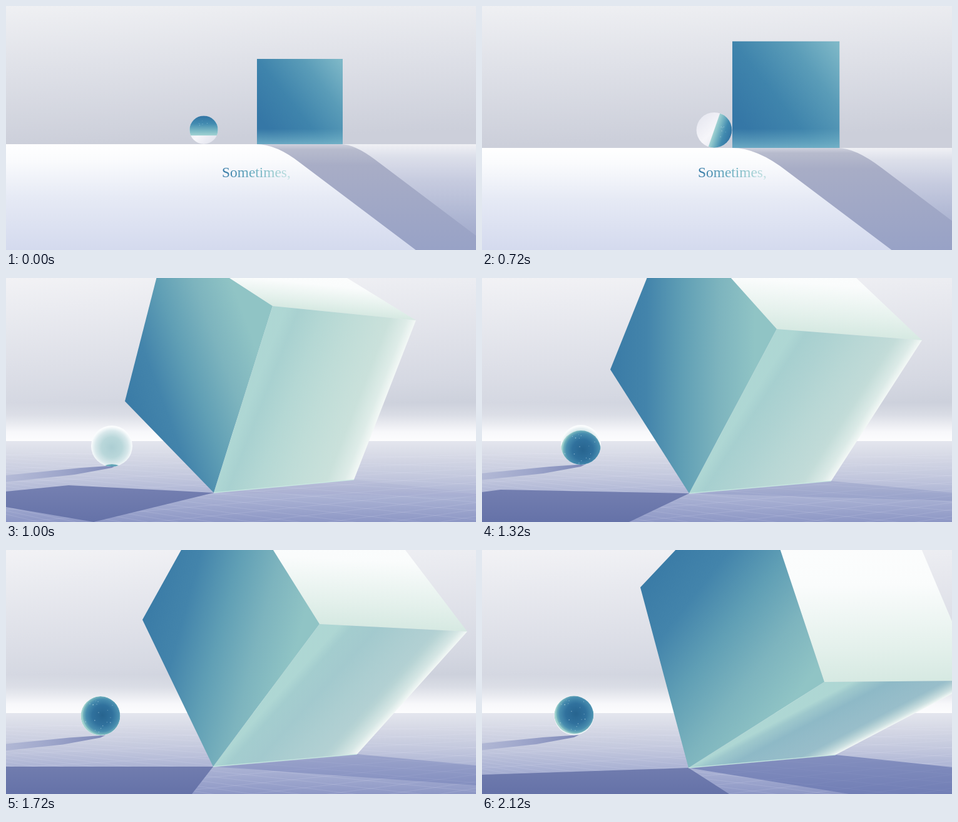
Write an HTML page with a canvas that moves like this. It is 751x392 px and loops after 2.2 s.

```html
<!DOCTYPE html>
<html lang="en">
<head>
<meta charset="utf-8">
<title>Ball and box</title>
<style>
html, body { margin: 0; width: 751px; height: 392px; overflow: hidden; }
canvas { display: block; }
</style>
</head>
<body>
<canvas id="stage" width="751" height="392"></canvas>
<script>
const W = 751, H = 392, LOOP = 2200, FPS = 15, CUT = 12;
const c = document.getElementById('stage').getContext('2d');

// Smooth curve through key values, held outside the key range
function track(keys, vals, k) {
  const n = keys.length - 1;
  if (k <= keys[0]) return vals[0];
  if (k >= keys[n]) return vals[n];
  let i = 0;
  while (k >= keys[i + 1]) i++;
  const slope = j => {
    const a = Math.max(0, j - 1), b = Math.min(n, j + 1);
    return (vals[b] - vals[a]) / (keys[b] - keys[a]);
  };
  const d = keys[i + 1] - keys[i], u = (k - keys[i]) / d, v = 1 - u;
  return v * v * (1 + 2 * u) * vals[i] + u * u * (3 - 2 * u) * vals[i + 1]
    + d * u * v * (v * slope(i) - u * slope(i + 1));
}

function stops(g, list) {
  for (let i = 0; i < list.length; i += 2) g.addColorStop(list[i], list[i + 1]);
  return g;
}
const linear = (x0, y0, x1, y1, ...list) => stops(c.createLinearGradient(x0, y0, x1, y1), list);
const down = (y0, y1, ...list) => linear(0, y0, 0, y1, ...list);
const radial = (x, y, r, ...list) => stops(c.createRadialGradient(x, y, 0, x, y, r), list);
const between = (p, q, u) => [p[0] + (q[0] - p[0]) * u, p[1] + (q[1] - p[1]) * u];

// Gradient that runs square from the line pq towards the point far
function fromEdge(p, q, far, ...list) {
  const dx = q[0] - p[0], dy = q[1] - p[1], len = Math.hypot(dx, dy);
  const nx = -dy / len, ny = dx / len;
  const dist = (far[0] - p[0]) * nx + (far[1] - p[1]) * ny;
  return linear(p[0], p[1], p[0] + nx * dist, p[1] + ny * dist, ...list);
}

function rect(x, y, w, h, fill) {
  c.fillStyle = fill;
  c.fillRect(x, y, w, h);
}

function poly(fill, ...pts) {
  c.beginPath();
  pts.forEach(p => c.lineTo(p[0], p[1]));
  c.closePath();
  c.fillStyle = fill;
  c.fill();
}

function disc(x, y, r, fill) {
  c.beginPath();
  c.arc(x, y, r, 0, 2 * Math.PI);
  c.fillStyle = fill;
  c.fill();
}

function specks(count, r, size) {
  let seed = 7;
  const rnd = () => (seed = seed * 16807 % 2147483647) / 2147483647;
  rnd();
  for (let i = 0; i < count; i++) {
    const a = rnd() * 2 * Math.PI, d = r * Math.sqrt(rnd());
    disc(Math.cos(a) * d, Math.sin(a) * d, size * (.5 + rnd() * .5), 'rgba(205,232,240,.6)');
  }
}

// Scene one: flat side view

const ROLL = [0, 5, 7.5, 11];

function ramp(x0, x1, cx, x2, y2, fill) {
  c.beginPath();
  c.moveTo(x0, 222);
  c.lineTo(x1, 222);
  c.quadraticCurveTo(cx, 222, x2, y2);
  c.lineTo(x2 + 330, y2 + 250);
  c.lineTo(x0, y2 + 250);
  c.fillStyle = fill;
  c.fill();
}

function flatBall(k) {
  const r = 22.7, cut = track(ROLL, [.4, 0, 0, 0], k) * r;
  c.save();
  c.translate(track(ROLL, [316, 276.5, 236, 376.8], k), 199);
  disc(0, 0, r, linear(-r, -r, r, r, 0, '#e3e4ee', .5, '#f6f6fa', 1, '#dcdeea'));
  c.clip();
  c.rotate(track(ROLL, [-90, -124, -150, 19], k) * Math.PI / 180);
  rect(-cut, -r, r + cut, 2 * r,
    linear(-cut, 0, r, 0, 0, '#a2d3d3', .25, '#79b7c4', .6, '#428bb0', 1, '#3274a3'));
  c.translate(r * .45, 0);
  specks(6, r * .4, .6);
  c.restore();
}

function flatScene(k) {
  rect(0, 0, W, H, linear(0, 0, 8, 225, 0, '#eff0f3', .45, '#dfe1e8', 1, '#cccfda'));

  const z = 1 + .0625 * Math.max(0, k - 9) ** 2;
  const bottom = 198 + 194 / z;
  c.save();
  c.translate(400, 198);
  c.scale(z, z);
  c.translate(-400, -198);

  rect(-100, 222, 1000, 300,
    down(222, bottom, 0, '#f0f1f5', .12, '#dcdfea', .35, '#c6cbdf', .7, '#adb5d2', 1, '#9ba4c8'));
  ramp(380, 535, 557, 590, 247,
    down(222, bottom, 0, '#cfd1dd', .05, '#b7bbcd', .2, '#a8adc6', 1, '#98a2c6'));
  ramp(-100, 400, 432, 470, 252,
    down(222, bottom, 0, '#ffffff', .15, '#fafbfd', .5, '#e6eaf5', 1, '#d4daee'));

  const x = track([0, 5], [401, 400], k), y = 85, s = 137;
  rect(x, y, s, s, linear(x + 12, y + 105, x + s, y + 8,
    0, '#3577a6', .35, '#3f84ac', .7, '#5a9cb8', 1, '#7db7c7'));
  rect(x, y + s * .82, s, s * .18,
    down(y + s * .82, y + s, 0, 'rgba(125,190,205,0)', 1, 'rgba(135,195,210,.65)'));
  flatBall(k);
  c.restore();

  c.font = '23.4px "Liberation Serif", "Times New Roman", serif';
  c.fillStyle = linear(345, 0, 454, 0, 0, '#3579a6', .45, '#6eafc2', .75, '#9acbd0', 1, '#c3e1e3');
  c.fillText('Sometimes,', 345, 275);
}

// Scene two: the box tips over

const TIP = [12, 15, 20, 26, 32];
const CORNERS = {
  left: [[180, 190, 205, 218, 253], [236, 198, 147, 112, 60]],
  base: [[332, 332, 331, 331, 330], [344, 345, 346, 348, 350]],
  front: [[395, 426, 471, 501, 547], [20, 45, 82, 119, 212]],
  right: [[622, 655, 703, 737, 791], [46, 68, 100, 131, 210]],
  foot: [[555, 556, 558, 561, 565], [323, 324, 326, 328, 329]],
  back: [[225, 257, 305, 349, 433], [-38, -65, -104, -125, -132]],
  far: [[395, 435, 493, 539, 650], [-45, -68, -100, -131, -126]]
};

function floor() {
  rect(0, 0, W, 263, linear(0, 0, 12, 235,
    0, '#f2f2f5', .2, '#ebecf1', .6, '#dee0e8', .85, '#d5d8e2', 1, '#cdd1dc'));
  rect(0, 200, W, 63, down(200, 263,
    0, 'rgba(252,252,254,0)', .3, 'rgba(252,252,254,.25)', .75, 'rgba(252,252,254,.9)', 1, '#fdfdfe'));
  rect(0, 262, W, 130, down(262, 392,
    0, '#e4e6ee', .2, '#d5d8e5', .45, '#c2c7dd', .7, '#a9b1d3', 1, '#8d97c5'));

  c.save();
  c.beginPath();
  c.rect(0, 280, W, 112);
  c.clip();
  c.strokeStyle = 'rgba(235,238,250,.13)';
  c.lineWidth = 1;
  c.beginPath();
  for (let i = 1; i < 22; i++) {
    c.moveTo(-500, 262);
    c.lineTo(W, 262 + i * 14);
    c.moveTo(1500, 262);
    c.lineTo(0, 262 + i * 22);
  }
  c.stroke();
  c.restore();
}

function boxShadow(k, base, foot) {
  const at = (...vals) => track(TIP, vals, k);
  const tip = [at(100, 140, 235, 297, 395), H];
  poly(`rgba(96,110,172,${at(0, .06, .2, .35, .6)})`, base, foot,
    [W, at(346, 346, 345, 346, 349)], [W, at(350, 352, 358, 378, 419)]);
  poly(down(333, H, 0, '#7580b1', 1, '#6572a8'), base,
    [at(130, 100, 30, 0, 0), at(331, 333, 340, 348, 361)],
    [0, at(344, 343, 344, 348, 362)], [0, at(362, 368, 392, 396, 396)], tip);
}

function roundBall(k) {
  const x = track(TIP, [180, 169, 158, 151, 147], k);
  const y = track(TIP, [271, 270, 268, 266.5, 266], k);
  const r = track(TIP, [33.5, 33, 32, 31.5, 31.5], k);
  const lift = track(TIP, [64, 62, 9, 0, -2], k);

  poly(linear(x, 0, x - 175, 0, 0, '#818bb9', .5, '#a0a8cc', 1, 'rgba(175,182,212,.7)'),
    [x + 8, y + 31], [x - 50, y + 35], [x - 180, y + 48],
    [x - 180, y + 59], [x - 60, y + 46], [x, y + 35]);

  c.save();
  c.translate(x, y);
  disc(0, 0, r, radial(0, 2, r, 0, '#acced3', .5, '#b9d7da', .8, '#d8e8eb', 1, '#fafcfd'));
  c.clip();
  c.translate(0, lift);
  disc(0, 0, r, radial(3, -1, r + 1, 0, '#27648f', .5, '#30719d', .8, '#488daf', .93, '#6fafbb', 1, '#a2d3cf'));
  c.rotate((k - 20) * -.03);
  specks(18, r * .85, .8);
  c.restore();
}

function box(k, p) {
  const { left, base, front, right, foot, back, far } = p;
  poly(fromEdge(front, right, back, 0, '#d6e9e2', .15, '#e3f0eb', .45, '#fafcfc', 1, '#ffffff'),
    front, right, far, back);
  poly(linear(...left, ...between(base, front, .75),
    0, '#3a7ba6', .25, '#4384ab', .5, '#609fb5', .75, '#7db4be', 1, '#90c4c5'),
    left, base, front, back);
  poly(fromEdge(foot, right, base,
    0, '#f3f8f6', .07, '#deece8', .2, '#cae1db', .5, '#bedcd7', .9, '#abd3d1', 1, '#b2dad5'),
    base, front, right, foot);

  const shade = `rgba(100,152,184,${track(TIP, [0, 0, .08, .22, .48], k)})`;
  poly(fromEdge(foot, right, base, 0, 'rgba(100,152,184,0)', .25, shade,
    .7, shade, 1, 'rgba(100,152,184,.05)'), base, front, right, foot);

  c.strokeStyle = 'rgba(205,238,228,.75)';
  c.lineWidth = 1.5;
  c.beginPath();
  c.moveTo(...base);
  c.lineTo(...foot);
  c.stroke();
}

function deepScene(k) {
  const p = {};
  for (const name in CORNERS) p[name] = CORNERS[name].map(v => track(TIP, v, k));
  floor();
  boxShadow(k, p.base, p.foot);
  roundBall(k);
  box(k, p);
}

function draw(now) {
  const k = Math.floor((now % LOOP + 14) * FPS / 1000) % 33;
  (k < CUT ? flatScene : deepScene)(k);
}

const start = performance.now();
function tick() {
  draw(performance.now() - start);
  requestAnimationFrame(tick);
}
tick();
</script>
</body>
</html>
```
